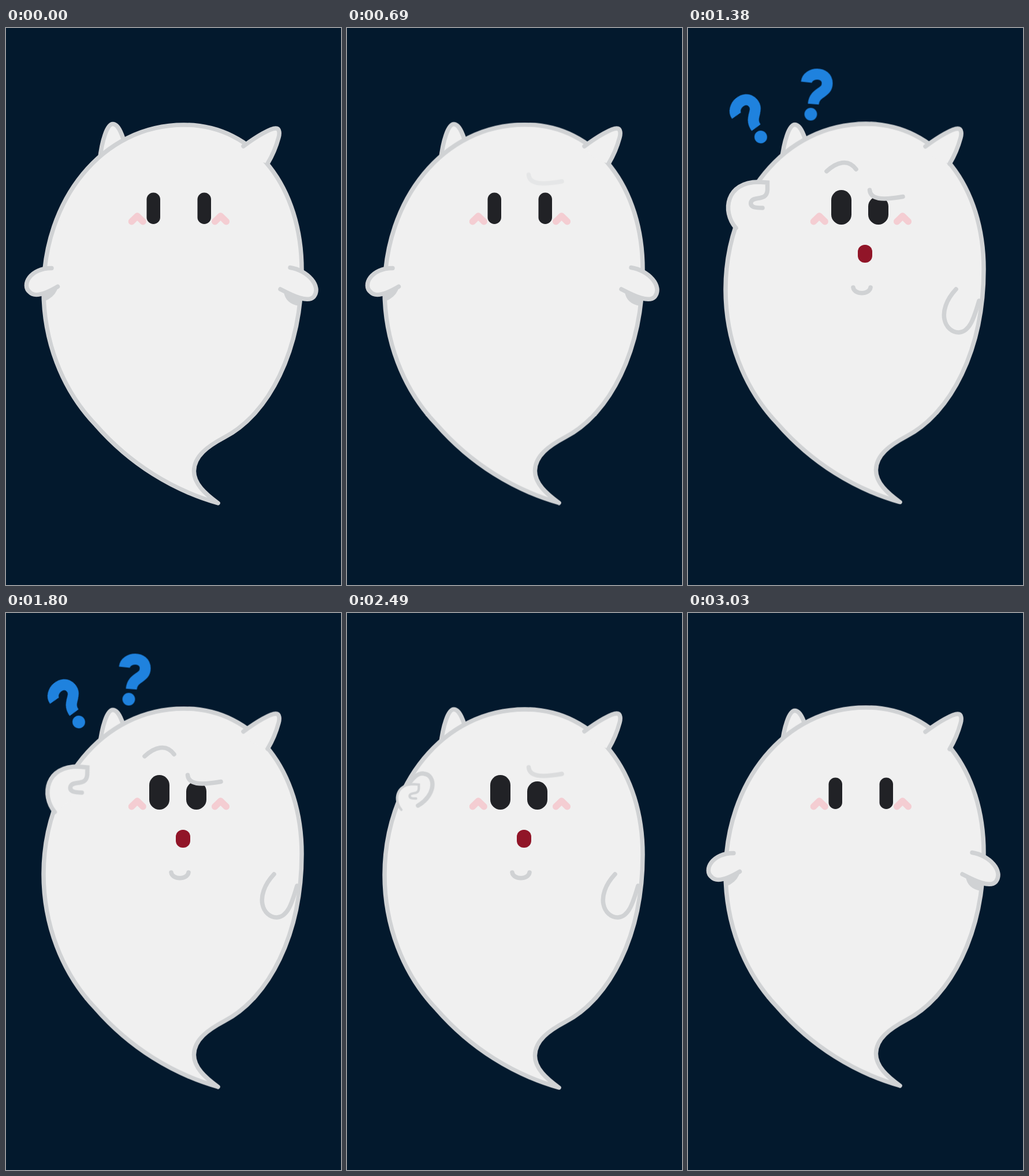
Recreate the animation shown at these times as an HTML page. Size 580 px wide and 966 px high, loop 3.06 s.

```html
<!DOCTYPE html>
<html lang="en">
<head>
<meta charset="utf-8">
<title>Puzzled ghost</title>
<style>
  :root { --skin: #f0f0f0; --edge: #d0d2d4; }
  html, body { margin: 0; width: 100%; height: 100%; overflow: hidden; background: #03192d; }
  svg { display: block; width: 100%; height: 100%; }

  .line { fill: none; stroke: var(--edge); stroke-width: 7.5; stroke-linecap: round; stroke-linejoin: round; }
  .solid { fill: var(--skin); }
  .shade { fill: var(--edge); }
  .cheek { fill: none; stroke: #f4cdd2; stroke-width: 11.5; stroke-linecap: round; stroke-linejoin: round; }
  .eye { fill: #212226; }

  /* every part shares one 3060 ms timeline */
  .anim { animation: 3060ms linear infinite both; }

  /* floating: body and ears drift by different amounts */
  .bob { animation-name: bob; animation-timing-function: cubic-bezier(.37, 0, .63, 1); }
  .body { --amp: -7.6px; }
  .ear-l { --amp: 5px; }
  .ear-r { --amp: 2px; }
  @keyframes bob {
    0%, 20.92%, 41.83%, 62.75%, 83.66% { transform: translateY(0); }
    10.46%, 31.37%, 52.29%, 73.2% { transform: translateY(var(--amp)); }
    94.12% { transform: translateY(var(--amp)); animation-timing-function: cubic-bezier(.45, 0, .75, .6); }
    100% { transform: translateY(calc(var(--amp) * .4)); }
  }

  .eye-l { animation-name: eye-l; }
  @keyframes eye-l {
    0%, 24.51%, 86.27%, 100% { x: 243.5px; y: 285.5px; width: 23.5px; height: 54.5px; rx: 11.75px; }
    28.43%, 31.37% { x: 250px; y: 312px; width: 32px; height: 0; rx: 16px; }
    35.29%, 82.35% { x: 248px; y: 281px; width: 35px; height: 60px; rx: 17.5px; }
  }
  .eye-r { animation-name: eye-r; }
  @keyframes eye-r {
    0%, 24.51%, 86.27%, 100% { x: 331.5px; y: 285.5px; width: 23.5px; height: 54.5px; rx: 11.75px; }
    29.41%, 82.35% { x: 312px; y: 292px; width: 35px; height: 49px; rx: 17.5px; }
  }

  .brow-r { animation-name: brow-r; }
  @keyframes brow-r {
    0%, 19.61%, 87.25%, 100% { transform: translateY(-40px); opacity: 0; }
    28.43%, 78.43% { transform: none; opacity: 1; }
  }
  .brow-l { animation-name: brow-l; }
  @keyframes brow-l {
    0%, 25.49%, 80.39%, 100% { opacity: 0; }
    29.41%, 77.45% { opacity: 1; }
  }

  .mouth { animation-name: mouth; transform-origin: 306.5px 392px; }
  .chin { transform-origin: 301px 453px; }
  @keyframes mouth {
    0%, 32.35%, 86.27%, 100% { transform: scale(0); }
    36.27%, 82.35% { transform: none; }
  }

  .shade-l { animation-name: shade-l; }
  @keyframes shade-l {
    0%, 25.49%, 88.24%, 100% { opacity: 1; }
    35.29%, 82.35% { opacity: 0; }
  }
  .shade-r { animation-name: shade-r; }
  @keyframes shade-r {
    0%, 23.53%, 88.24%, 100% { opacity: 1; }
    29.41%, 83.33% { opacity: 0; }
  }

  /* left arm swings up, then gives way to the scratching hand */
  .arm-l { animation-name: swing, arm-gone; transform-origin: 85px 432px; }
  @keyframes swing {
    0%, 25.49%, 88.24%, 100% { transform: translate(0, 0) rotate(0deg); }
    30.39%, 85.29% { transform: translate(1px, -22px) rotate(51deg); }
    35.29%, 81.37% { transform: translate(25px, -109px) rotate(150deg); }
  }
  @keyframes arm-gone {
    0%, 36.2%, 79.41%, 100% { opacity: 1; }
    36.27%, 79.35% { opacity: 0; }
  }
  .hand { animation-name: hand; transform-origin: 108px 334px; }
  @keyframes hand {
    0%, 33.33% { transform: scale(0); }
    38.24%, 78.43% { transform: scale(1); }
    81.37% { transform: scale(.56); }
    84.31%, 100% { transform: scale(0); }
  }
  .scratch { animation: scratch 140ms 1380ms ease-in-out infinite alternate; transform-origin: 108px 305px; }
  @keyframes scratch {
    from { transform: none; }
    to { transform: translate(2.5px, -1px) rotate(1.5deg); }
  }

  .arm-r { animation-name: arm-r; }
  @keyframes arm-r {
    0%, 23.53%, 88.24%, 100% { d: path("M492 415.5C522 420 547 448 533 466C523 477 498 465 475 453"); }
    30.39%, 85.29% { d: path("M493 464C500 485 498 520 474 523.5C454 524 455 500 453 467"); }
    35.29%, 82.35% { d: path("M504 473C497 495 490 527 469 528C445 528 428 492 464 453"); }
  }

  .pop { animation-name: pop; transform-origin: 3.5px 10px; }
  .late { animation-delay: 60ms; }
  @keyframes pop {
    0% { transform: scale(0); }
    29.41% { transform: scale(0); animation-timing-function: cubic-bezier(.4, .2, .6, 1); }
    34.31% { transform: scale(1.07); animation-timing-function: ease-in-out; }
    36.27%, 74.51% { transform: scale(1); }
    76.47% { transform: scale(1.07); animation-timing-function: ease-in; }
    79.41%, 100% { transform: scale(0); }
  }
</style>
</head>
<body>
<svg viewBox="0 0 580 966" role="img" aria-label="A ghost scratching its head: ??">
  <defs>
    <g id="ask">
      <path d="M-7.5-55.5C-5.5-73.5 28.5-75.5 28.5-53.5C28.5-35.5 6.5-39.5 4.5-17.5" fill="none" stroke="#1f82de" stroke-width="19"/>
      <circle r="10.9" fill="#1f82de"/>
    </g>
    <path id="cheek" class="cheek" d="M-9.8 335.7L0 326L9.8 335.7"/>
  </defs>

  <path class="line solid anim bob ear-l" style="fill: var(--skin)" d="M162 230C166 195 175 166.5 185 166.5C195 166.5 202 185 210 215"/>

  <path class="line anim bob body" style="fill: var(--skin)" d="M367 824C290 802 215 757 155 688C95 625 65 540 65 455C65 300 165 168 308 168C432 168 512 278 512 420C512 560 455 670 378 710C350 725 326 742 325.500 768C325 790 345 808 367 824Z"/>

  <g class="anim bob ear-r">
    <path class="solid" d="M411 205C435 187 458 174 467 174C474 174 474 183 472 190C468 205 462 220 453 235Q425 230 411 205"/>
    <path class="line" d="M411 205C435 187 458 174 467 174C474 174 474 183 472 190C468 205 462 220 453 235"/>
  </g>

  <!-- face -->
  <use href="#cheek" x="227.3"/>
  <use href="#cheek" x="371.5"/>
  <rect class="eye anim eye-l"/>
  <rect class="eye anim eye-r"/>
  <g class="anim brow-r">
    <path class="solid" d="M314.500 281C316 297 335 299 372 292.500V275H314.500Z"/>
    <path class="line" d="M314.500 281C316 297 335 299 372 292.500"/>
  </g>
  <path class="line anim brow-l" d="M240 248.500C257 233 277 226 291 245"/>
  <rect class="anim mouth" x="294" y="376" width="25" height="31" rx="12" fill="#911528"/>
  <path class="line anim mouth chin" d="M286 450C288 463 314 463 316 450"/>

  <!-- arms -->
  <path class="shade anim shade-l" d="M64 468L69 444L85 440Q91 447 88 455Q82 468 66 474Z"/>
  <path class="shade anim shade-r" d="M480 455L514 466L507 482Q484 478 481 458Z"/>
  <path class="line anim arm-l" style="fill: var(--skin)" d="M79 416.500C42 416 26 446 41 458C50 468 70 460 89.500 448.500"/>
  <path class="line anim arm-r" style="fill: var(--skin)" d="M492 415.500C522 420 547 448 533 466C523 477 498 465 475 453"/>
  <g class="anim hand">
    <path class="line scratch" style="fill: var(--skin); stroke-linejoin: miter" d="M83 347C58 318 66 267 122 267L137.500 268V281C136 302 113 290 109 302C107 312 120 312 129 312"/>
  </g>

  <g transform="translate(212.500 149.500)"><use class="anim pop" href="#ask"/></g>
  <g transform="translate(126 189) rotate(-41)"><use class="anim pop late" href="#ask"/></g>
</svg>
</body>
</html>
```
